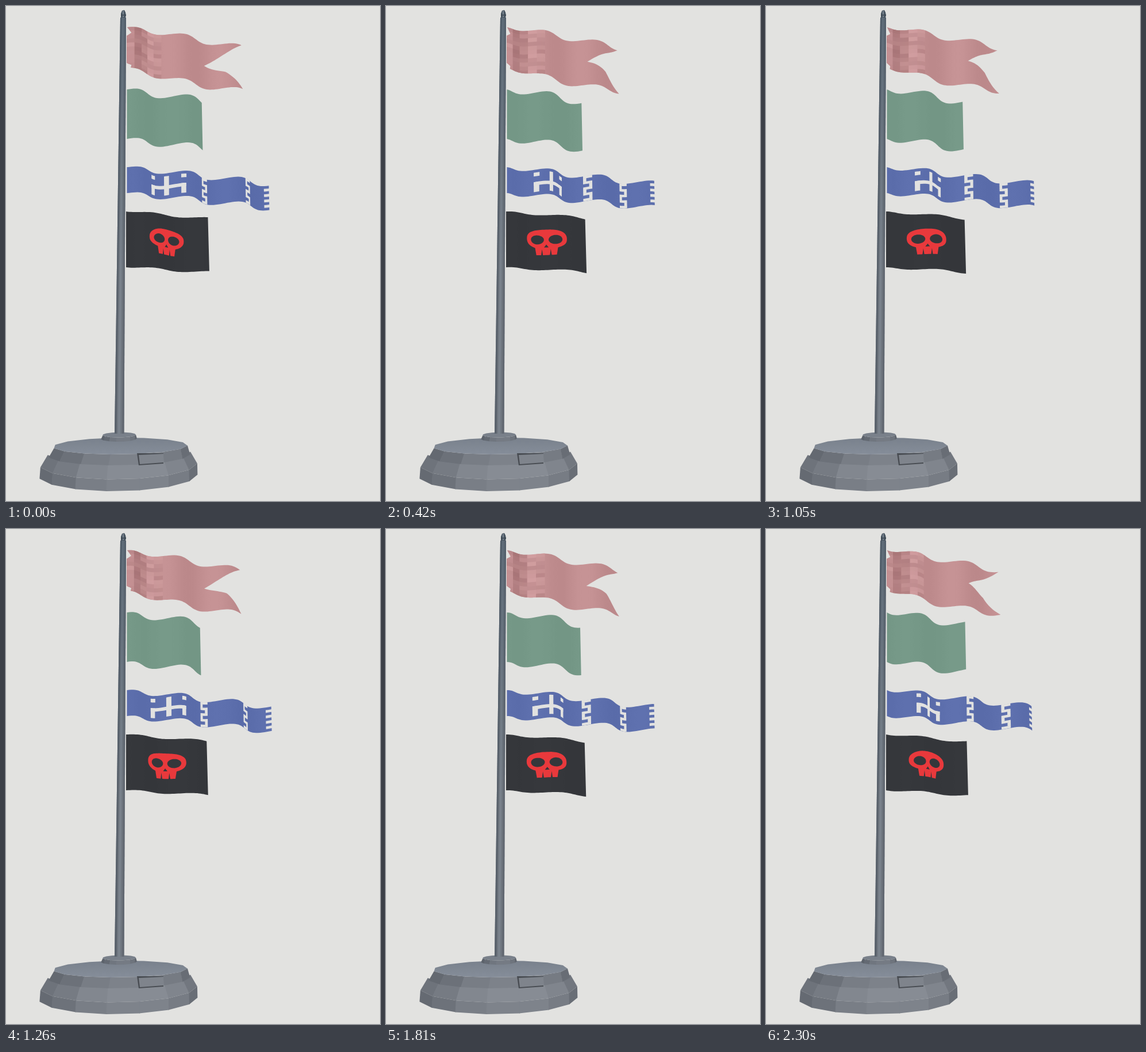
These frames come from a looping animation (651 by 860 pixels, 2360 ms). An HTML page with a canvas:

```html
<!DOCTYPE html>
<html>
<head>
<meta charset="utf-8">
<style>
html, body { margin: 0; width: 100%; height: 100%; overflow: hidden; background: #e2e2e0; }
canvas { display: block; }
</style>
</head>
<body>
<canvas id="c" width="651" height="860"></canvas>
<script>
const ctx = document.getElementById('c').getContext('2d');
const BG = '#e2e2e0', TAU = Math.PI * 2;

// len: cloth length, slope: sag of the top edge, h: height at the pole, shrink: height ratio at the far end,
// amp/wave/off/period: travelling wave, skew: sideways share of the wave
const red = { x: 211, y: 37, len: 197, slope: .192, h: 70, shrink: 1, amp: 5, wave: 90, off: 5, period: 670, skew: .8, lift: -2, lean: 0, rgb: [193, 142, 144], shade: 16 };
const green = { x: 210.5, y: 145, len: 131.5, slope: .165, h: 86, shrink: .96, amp: 7, wave: 94, off: 8.5, period: 667, skew: .83, lift: -1, lean: 1.7, rgb: [117, 152, 135], shade: 5 };
const blue = { x: 210.5, y: 280, len: 250, slope: .118, h: 45, shrink: .94, amp: 5.3, wave: 90, off: 12, period: 671, skew: 1.1, lift: -.5, lean: 1, rgb: [92, 110, 172], shade: 8 };
const black = { x: 209, y: 357, len: 139, slope: .091, h: 97, shrink: .965, amp: 2.3, wave: 105, off: 40, period: 730, skew: 1.3, lift: -.5, lean: 2.5, rgb: [53, 55, 59], shade: 6 };

let now = 0;

function sway(f, u) {
  const ramp = 1 - Math.exp(-Math.max(u, 0) / 20);
  return ramp * (f.lift - f.amp * Math.cos(TAU * ((u - f.off) / f.wave - now / f.period)));
}

// Cloth coordinates (u along, v below the top edge) to the stage.
function place(f, [u, v]) {
  const w = sway(f, u), k = u / f.len;
  return [f.x + u - f.skew * w + f.lean * k * v / f.h,
          f.y + f.slope * u + v * (1 - (1 - f.shrink) * k) + w];
}

function fillPath(pts, fill) {
  ctx.beginPath();
  for (const p of pts) ctx.lineTo(...p);
  ctx.closePath();
  ctx.fillStyle = fill;
  ctx.fill();
}

// Fills a polygon given in cloth coordinates, bent with the wave.
function patch(f, fill, pts) {
  const out = [];
  pts.forEach((a, i) => {
    const b = pts[(i + 1) % pts.length];
    const n = Math.ceil(Math.hypot(b[0] - a[0], b[1] - a[1]) / 3) || 1;
    for (let j = 0; j < n; j++)
      out.push(place(f, [a[0] + (b[0] - a[0]) * j / n, a[1] + (b[1] - a[1]) * j / n]));
  });
  fillPath(out, fill);
}

const box = (u, v, u2, v2) => [[u, v], [u2, v], [u2, v2], [u, v2]];
const sheet = f => box(0, 0, f.len, f.h);
const tint = (rgb, d, a = 1) => `rgba(${rgb.map(c => Math.round(c + d)).join()},${a})`;

// Superellipse: power 2 is a plain oval, higher is boxier.
function oval(u, v, ru, rv, power = 2) {
  const bend = x => Math.sign(x) * Math.abs(x) ** (2 / power);
  return Array.from({ length: 48 }, (_, i) => {
    const a = i / 48 * TAU;
    return [u + ru * bend(Math.cos(a)), v + rv * bend(Math.sin(a))];
  });
}

function clothFill(f) {
  const g = ctx.createLinearGradient(f.x, 0, f.x + f.len, 0);
  for (let i = 0; i <= 24; i++) {
    const u = f.len * i / 24;
    g.addColorStop(i / 24, tint(f.rgb, (sway(f, u - 1) - sway(f, u + 1)) / 2 * f.shade));
  }
  return g;
}

function drawRed() {
  const f = red, low = [];
  for (let u = f.len; u >= 0; u -= 8) low.push([u, 70 + .138 * u - .00058 * u * u]);
  ctx.save();
  patch(f, clothFill(f), [[0, 0], [194, 0], [136, 38], [168, 49], ...low,
    [6, 66], [-1, 62], [-1, 15], [6, 10]]);
  ctx.clip();
  // patchwork of shaded tiles near the pole
  let seed = 11;
  const rand = () => (seed = seed * 16807 % 2147483647) / 2147483647;
  [4, -22, -8, 8, 2].forEach((tone, col) => {
    const u = col * 12.5 - 2;
    for (let row = 0; row < 12; row++)
      patch(f, tint(f.rgb, tone + (rand() - .5) * 24, .75), box(u, row * 7 - 1, u + 12.7, row * 7 + 6.2));
  });
  ctx.restore();
}

function drawBlue() {
  const f = blue, cut = (...b) => patch(f, BG, box(...b));
  patch(f, clothFill(f), sheet(f));
  // emblem
  cut(68, 5, 74.5, 39);
  cut(46, 21.5, 97, 27.5);
  for (const u of [46, 90]) {
    cut(u, 5, u + 7.5, 11.5);
    cut(u, 21.5, u + 7, 39);
  }
  // meandering seams
  for (const u of [133, 201]) {
    for (let i = 0; i < 5; i++) {
      const v = i * 10.2 - .5, side = u + (i % 2 ? 7.5 : 0);
      cut(u, v, u + 11.5, v + 4.6);
      if (i < 4) cut(side, v + 4, side + 4, v + 10.7);
    }
  }
  // frayed end
  for (let i = 0; i < 4; i++) cut(243, 5 + i * 10, f.len + 2, 10 + i * 10);
}

function drawBlack() {
  const f = black, dark = tint(f.rgb, 0), bone = '#e8393c', mid = 69.5;
  patch(f, clothFill(f), sheet(f));
  patch(f, bone, oval(mid, 42.5, 32, 17, 2.4));
  patch(f, bone, [[mid - 18, 54], [mid + 18, 54], [mid + 15.5, 70.5], [mid - 15.5, 70.5]]);
  for (const side of [-1, 1]) {
    const slit = mid + side * 6.5;
    patch(f, dark, oval(mid + side * 14, 43.5, 10.5, 8));
    patch(f, dark, [[slit, 60], [slit + 1.5, 71.5], [slit - 1.5, 71.5]]);
  }
  patch(f, dark, [[mid, 52], [mid + 3.5, 57], [mid - 3.5, 57]]);
}

// Corner i of a 15-sided ring seen slightly from above; corners 0 to 7 face the viewer.
function corner([x, y, rx, ry], i) {
  const a = (i * 24 - 80.5) * Math.PI / 180, dx = rx * Math.sin(a);
  return [x + dx, y + ry * Math.cos(a) - dx * .012];
}

function wall(top, low, rgb) {
  for (let i = 0; i < 7; i++) {
    const d = -3.2 * (i - 3.4) ** 2 + 6;
    fillPath([corner(top, i), corner(top, i + 1.02), corner(low, i + 1.02), corner(low, i)],
      tint(rgb, Math.max(d, -20)));
  }
}

function lid(ring, fill) {
  fillPath(Array.from({ length: 15 }, (_, i) => corner(ring, i)), fill);
}

function drawBase() {
  const foot = [195, 815, 138.5, 28], waist = [195.5, 795.5, 137.5, 27], neck = [196, 775, 125, 22];
  const step = [196.5, 780, 124, 18], deck = [199, 764.5, 117, 14.5];
  wall(neck, waist, [130, 135, 143]);
  wall(waist, foot, [121, 126, 134]);
  wall(deck, step, [120, 125, 133]);
  const top = ctx.createLinearGradient(0, 748, 0, 780);
  top.addColorStop(0, '#78808b');
  top.addColorStop(1, '#868e9a');
  lid(deck, top);
  // raised stone
  fillPath([[228, 777], [274, 777], [274, 795], [231, 798]], '#484c52');
  fillPath([[231, 780], [274, 778], [274, 793], [233, 796]], '#7f848c');
  const hub = [197, 745, 29, 4.5];
  wall(hub, [196.5, 751.5, 31.5, 5.5], [112, 118, 127]);
  lid(hub, '#79808a');
}

function drawPole() {
  // a and b are shares of the pole's width
  const strip = (a, b, fill) => fillPath([[199 + 10 * a, 20], [199 + 10 * b, 20],
    [189 + 16.5 * b, 743], [189 + 16.5 * a, 743]], fill);
  strip(0, 1, '#6f767f');
  strip(0, .22, '#5a626c');
  strip(.35, .6, '#7a828c');
  strip(.78, 1, '#636972');
  const fade = ctx.createLinearGradient(0, 20, 0, 480);
  fade.addColorStop(0, 'rgba(62,82,98,.45)');
  fade.addColorStop(1, 'rgba(62,82,98,0)');
  strip(0, 1, fade);
  fillPath([[200, 13], [202, 8], [206, 7], [208, 11], [209, 16], [208, 20], [200, 20]], '#46525e');
  fillPath([[202.5, 9], [205, 8], [205.5, 19], [203, 19]], '#75818c');
  fillPath([[200, 15], [209, 15], [209, 16.5], [200, 16.5]], '#3c4751');
}

// The picture advances in 70 ms steps, with one 60 ms step before 1460.
function step(t) {
  return t < 1460 ? Math.min(1400, Math.floor(t / 70) * 70) : 1460 + Math.floor((t - 1460) / 70) * 70;
}

let start;
function draw(time) {
  start ??= time;
  now = step((time - start) % 2360);
  ctx.fillStyle = BG;
  ctx.fillRect(0, 0, 651, 860);
  drawBase();
  drawRed();
  patch(green, clothFill(green), sheet(green));
  drawBlue();
  drawBlack();
  drawPole();
  requestAnimationFrame(draw);
}
requestAnimationFrame(draw);
</script>
</body>
</html>
```
